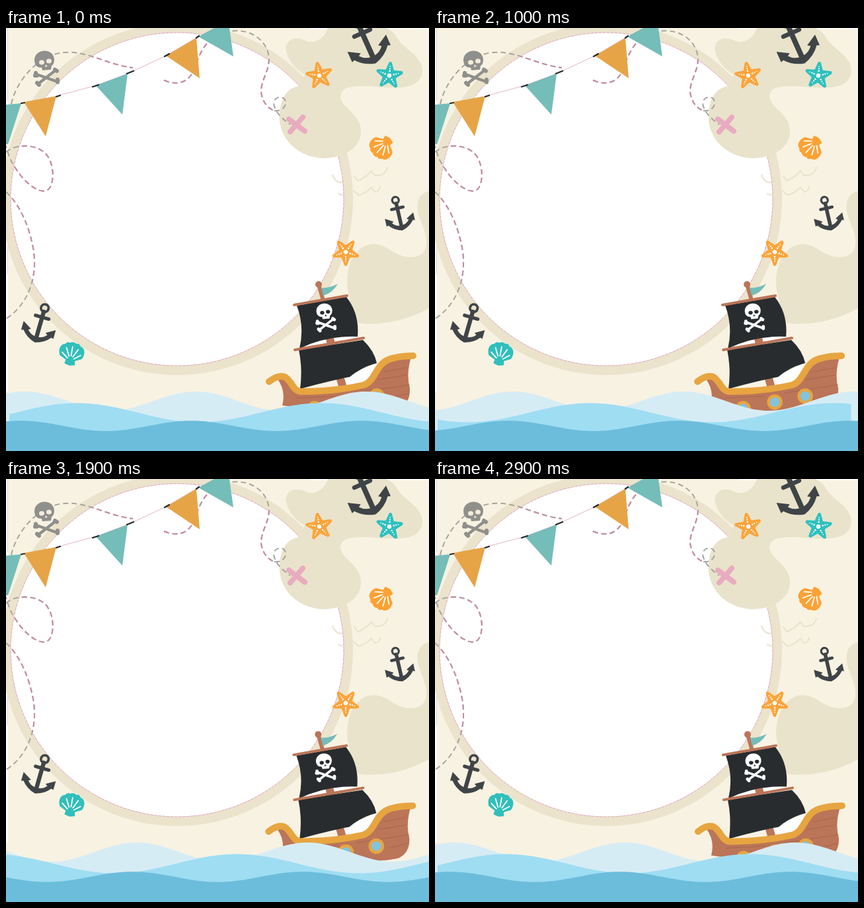
An HTML page that plays this animation: 640 by 640 pixels, repeating every 3 s.

```html
<!DOCTYPE html>
<html lang="en">
<head>
<meta charset="utf-8">
<title>Pirate party frame</title>
<style>
  html, body { margin: 0; width: 100%; height: 100%; overflow: hidden; background: #f8f2e2; }
  svg { display: block; width: 640px; height: 640px; }
</style>
</head>
<body>
<svg viewBox="0 0 640 640" fill="none" stroke-linecap="round" stroke-linejoin="round">
  <defs>
    <clipPath id="disc"><circle cx="259" cy="259" r="252"/></clipPath>

    <g id="trail" stroke-width="2" stroke-dasharray="8 5" stroke-linecap="butt">
      <path d="M8 115C16 78 50 40 88 37C122 34 155 56 192 60"/>
      <path d="M239 79C262 89 278 80 285 62C294 34 306 10 338 5C372 0 396 20 398 46C398 66 386 78 386 97C388 112 396 122 406 125"/>
      <path d="M0 188C12 176 44 174 60 190C72 203 74 230 66 242C56 256 30 236 17 216C8 203 4 195 0 178"/>
      <path d="M0 248C22 268 36 302 42 338C48 386 28 422 0 440"/>
    </g>

    <g id="anchor">
      <circle cy="-21" r="5" stroke="#3f4447" stroke-width="3.2"/>
      <path d="M0-16V20" stroke="#3f4447" stroke-width="5.5"/>
      <path d="M-9-8.500H9" stroke="#3f4447" stroke-width="4.500"/>
      <path fill="#3f4447" d="M-22 3L-10 10L-13 12Q-9 17-3 18H3Q9 17 13 12L10 10L22 3L22 15L19 14Q12 23 0 26Q-12 23-19 14L-22 15Z"/>
    </g>

    <g id="shell">
      <path fill="currentColor" d="M0 18L-8 16L-7 10L-17 5C-22-5-17-13-12-13Q-9-18-5-16Q0-20 5-16Q9-18 12-13C17-13 22-5 17 5L7 10L8 16Z"/>
      <path stroke="#fff" stroke-width="1.800" d="M-5 7L-14 0M-3 4L-9-8M0 3V-11M3 4L9-8M5 7L14 0"/>
    </g>

    <g id="skull">
      <g stroke="currentColor" stroke-width="4.500">
        <path d="M-15 9L16 20M14 3L-13 24"/>
        <path stroke-width="6" d="M-16 7V11M-14 11H-17M17 17V21M13 2L16 4M-14 22L-11 25"/>
      </g>
      <path fill="currentColor" d="M-18-11C-19-30 10-32 12-14Q12-6 8-4L7 2L-6 3L-7-1Q-17-1-18-11Z"/>
      <g fill="var(--hole)">
        <ellipse cx="-7" cy="-9" rx="4" ry="3.500"/>
        <ellipse cx="4" cy="-11" rx="4" ry="3.500"/>
        <path d="M-1-6L2-3L-2-2Z"/>
      </g>
    </g>
  </defs>

  <rect width="640" height="640" fill="#f8f2e2"/>
  <path fill="#fff" d="M0 0H3V550H0ZM460 0H640V2H460Z"/>
  <path stroke="#c9c9c4" stroke-width=".7" d="M2.500 0V110M2.500 300V372"/>

  <!-- round window -->
  <circle cx="259" cy="259" r="266" fill="#ebe3cc"/>
  <circle cx="259" cy="259" r="252" fill="#fff" stroke="#e0a3bb" stroke-dasharray="4 2"/>
  <use href="#trail" stroke="#a6a59c"/>
  <g clip-path="url(#disc)"><use href="#trail" stroke="#c78ca6"/></g>

  <!-- islands -->
  <g fill="#e9e3cb">
    <path d="M487 0C482 16 468 24 455 20C441 13 427 14 423 30C425 46 436 62 452 70L444 88C426 90 417 104 414 126C410 162 436 194 478 197C516 197 538 178 537 155C536 128 506 122 506 102C508 88 526 88 548 88C580 90 626 98 630 66C630 40 602 34 590 12Q585 4 575 0Z"/>
    <path d="M640 247C622 250 619 270 626 288C634 308 642 328 630 341C616 352 596 346 580 335C564 324 546 324 533 337C518 352 514 376 517 396C521 416 525 436 533 446C560 451 606 444 640 424Z"/>
  </g>
  <path stroke="#a6a59c" stroke-width="2" stroke-dasharray="8 5" stroke-linecap="butt" d="M406 125C420 127 428 114 420 106C408 101 402 112 407 121C411 131 419 138 430 146"/>
  <path stroke="#e9abc0" stroke-width="8" d="M428 138L452 156M449 135L430 157"/>
  <path stroke="#ebe2ce" stroke-width="2" d="M494 222Q498 234 508 234M527 224L532 231Q544 227 553 216L558 223Q574 224 577 211M503 251L510 253M526 246L533 253Q545 250 553 241L558 248Q565 248 566 240"/>
  <use href="#skull" transform="translate(61 61)" style="color:#8f8f8b;--hole:#f3ecda"/>

  <!-- bunting -->
  <path stroke="#e5b3c6" stroke-width="1" d="M76 103L136 87L184 69L242 42L291 13"/>
  <path fill="#74bdb9" d="M0 116L23 114L3 176H0ZM136 87L184 69L176 131ZM291 13L315 0H338L344 43Z"/>
  <path fill="#e7a446" d="M27 112L76 103L60 164ZM242 42L288 15L293 76Z"/>
  <path stroke="#26282b" stroke-width="2.200" d="M23 114L28 113M76 104L82 102M131 89L140 86M183 69L193 65M240 43L247 39M288 15L292 12"/>

  <use href="#anchor" transform="translate(544 19) rotate(-24) scale(1.45)"/>
  <use href="#anchor" transform="translate(594 281) rotate(-13)"/>
  <use href="#anchor" transform="translate(52 447) rotate(16) scale(1.15)"/>
  <use href="#shell" transform="translate(569 180) rotate(222)" color="#fca235"/>
  <use href="#shell" transform="translate(99 493) rotate(10)" color="#30bfbb"/>
  <g id="stars"></g>

  <g id="ship">
    <path stroke="#bb7558" stroke-width="6" d="M473 388L481 416"/>
    <circle cx="473" cy="388" r="5" fill="#bb7558"/>
    <path fill="#74bdb9" d="M477 393Q489 394 502 387Q494 401 480 405Z"/>
    <path fill="#fff" d="M446 485Q485 465 532 467L530 472ZM505 532L561 507L548 536L510 545Z"/>
    <path stroke="#bb7558" stroke-width="12" stroke-linecap="butt" d="M489 466L493 482M504 524L511 548"/>
    <path fill="#282c2f" d="M440 420L515 407Q535 432 532 467Q485 465 444 485Q452 452 440 420Z"/>
    <path fill="#282c2f" d="M443 487L540 472Q557 488 561 507Q538 513 520 528Q492 533 445 546Q449 515 443 487Z"/>
    <path stroke="#bb7558" stroke-width="4" d="M436 419L516 405M437 487L541 469"/>
    <use href="#skull" transform="translate(484 438) scale(.8)" style="color:#fff;--hole:#282c2f"/>
    <path fill="#bb7558" d="M410 530Q424 548 418 571Q470 580 520 580Q570 581 595 575Q612 567 611 545Q605 524 613 498L578 503L550 540L448 550L425 530Z"/>
    <path stroke="#aa674c" stroke-width="1" d="M572 520L606 514M563 532L607 525M530 552L610 540M440 560L500 557M580 560L609 553"/>
    <path stroke="#e7a540" stroke-width="10" d="M398 535Q412 524 422 528C434 536 434 549 446 550C480 550 516 546 542 540C562 532 558 504 588 499Q600 496 616 496"/>
    <g fill="#83c3dd" stroke="#e7a540" stroke-width="4.500">
      <circle cx="467" cy="576" r="9.500"/>
      <circle cx="515" cy="566" r="9.500"/>
      <circle cx="561" cy="557" r="9.500"/>
    </g>
  </g>

  <g id="sea"></g>
</svg>
<script>
const TAU = Math.PI * 2, FRAMES = 30, FRAME_MS = 100;
const byId = id => document.getElementById(id);
const polar = (r, a) => [r * Math.cos(a), r * Math.sin(a)];

function starfish(x, y, rotation, color) {
  let outline = '', dots = '<circle r="3.200"/>';
  for (let i = 0; i < 5; i++) {
    const a = TAU * (i / 5 - .25);
    outline += polar(18.5, a) + ' ' + polar(7.5, a + TAU / 10) + ' ';
    for (const r of [7, 10.500, 14]) {
      const [cx, cy] = polar(r, a);
      dots += `<circle cx="${cx}" cy="${cy}" r="${1.700 - r / 17}"/>`;
    }
  }
  return `<g transform="translate(${x} ${y}) rotate(${rotation})">
    <polygon points="${outline}" fill="${color}" stroke="${color}" stroke-width="5"/>
    <g fill="#fff">${dots}</g></g>`;
}
byId('stars').innerHTML = starfish(474, 72, -9, '#fba43a')
  + starfish(580, 72, 5, '#2fc0be') + starfish(514, 339, 36, '#fba43a');

// Back to front; each wave advances one wavelength per loop.
const waves = [
  { color: '#d6ecf4', crest: 29, length: 258, mid: 564.5, height: 14.5 },
  { color: '#9fddf3', crest: 107, length: 370, mid: 582, height: 14.5,
    left: p => 1 + 7 * Math.sin(TAU * p + .6),
    right: p => 640 - 11 * Math.cos(TAU * (p - .383)) },
  { color: '#6cbddb', crest: 22, length: 258, mid: 602, height: 7.800 },
];
byId('sea').innerHTML = waves.map(w => `<path fill="${w.color}"/>`).join('');
const wavePaths = byId('sea').children;

function wavePath(w, progress, loop) {
  const left = w.left ? Math.max(0, w.left(loop)) : 0;
  const right = w.right ? Math.min(640, w.right(loop)) : 640;
  const crest = w.crest + w.length * progress;
  const height = x => w.mid - w.height * Math.cos(TAU * (x - crest) / w.length);
  let d = `M${left} 640`;
  for (let x = left; x < right; x += 4) d += `L${x} ${height(x)}`;
  return d + `L${right} ${height(right)}V640Z`;
}

function draw(now) {
  const frame = Math.floor(now / FRAME_MS) % FRAMES;
  const loop = frame / FRAMES;
  waves.forEach((w, i) =>
    wavePaths[i].setAttribute('d', wavePath(w, frame / (FRAMES - 1), loop)));
  const dx = .6 * (Math.cos(TAU * loop * 2) - 1);
  const dy = 1.700 * Math.sin(TAU * loop * 6);
  byId('ship').setAttribute('transform', `translate(${dx} ${dy})`);
}

const start = performance.now();
function tick() {
  draw(performance.now() - start);
  requestAnimationFrame(tick);
}
tick();
</script>
</body>
</html>
```
